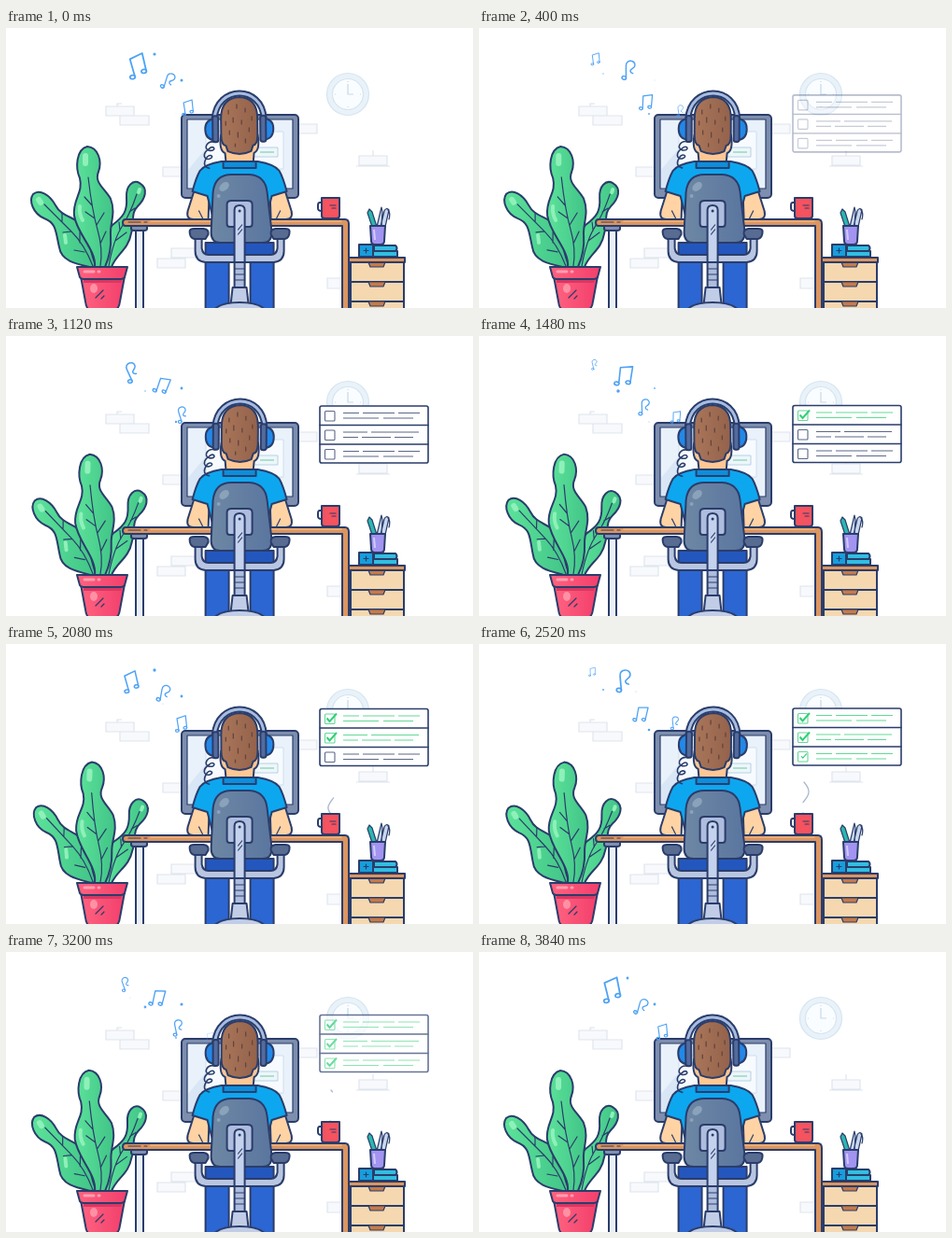
These frames come from a looping animation (500 px wide and 300 px high, 3.88 s). An HTML page:

```html
<!DOCTYPE html>
<html lang="en">
<head>
<meta charset="utf-8">
<title>Working with music</title>
<style>
html, body { margin: 0; height: 100%; overflow: hidden; background: #fff; }
svg { display: block; width: 500px; height: 300px; }
.ink { stroke: #2a3d6b; stroke-width: 2; stroke-linejoin: round; stroke-linecap: round; }
.thin { stroke-width: 1.2; }
.line { fill: none; stroke-linecap: round; stroke-linejoin: round; }
.faint { stroke: #dfe5ee; fill: #f7f9fc; stroke-width: 1.2; }
.note { fill: none; stroke: #4ea2f5; stroke-width: 1.8; stroke-linecap: round; stroke-linejoin: round; }
.note ellipse, #dots { fill: #4ea2f5; }
</style>
</head>
<body>
<svg viewBox="0 0 500 300">
  <defs>
    <linearGradient id="leaf"><stop stop-color="#5ce29a"/><stop offset="1" stop-color="#41c487"/></linearGradient>
    <linearGradient id="pink"><stop stop-color="#ff6380"/><stop offset="1" stop-color="#f23f6c"/></linearGradient>
    <linearGradient id="back"><stop stop-color="#6d87a4"/><stop offset="1" stop-color="#5b769f"/></linearGradient>
    <linearGradient id="hair"><stop stop-color="#a9765a"/><stop offset="1" stop-color="#94624b"/></linearGradient>
    <g id="double"><path d="M-5 11L-7 -8L7 -12L8 7"/><ellipse cx="-7.500" cy="11.500" rx="2.800" ry="2"/><ellipse cx="5.500" cy="7.500" rx="2.800" ry="2"/></g>
    <g id="single"><path d="M0 10L-4 -5C-7 -14 7 -16 7 -8C7 -4 2 -3 3 0Q4 2 7 2"/><ellipse cx="-2.500" cy="10.500" rx="2.800" ry="2.200"/></g>
    <g id="arm">
      <path class="ink" fill="#ffd3a4" d="M201 174L194 196Q192 205 200 205H216L217 177Z"/>
      <path class="ink line thin" d="M210 204L206 196"/>
      <path class="ink" fill="#0da7f0" d="M250 143H230Q212 146 207 153Q203 160 199 175L215 180L222 207H250"/>
    </g>
    <g id="rest">
      <path class="ink" fill="#b9c6e1" d="M202 225H209V236Q210 243 216 243H250V251H213Q202 250 202 239Z"/>
      <path class="ink" fill="#586b91" d="M196 218Q196 215 201 215H211Q217 216 216 221L213 226H201Q196 225 196 218Z"/>
    </g>
    <path id="leg" class="ink" fill="#2c66d2" d="M213 250H238V302H213Z"/>
    <g id="cup">
      <path class="ink" fill="#2388e8" d="M223 97Q213 98 213 108Q213 119 223 120Z"/>
      <rect class="ink" x="221" y="94" width="6" height="28" rx="2.500" fill="#536b9d"/>
    </g>
    <g id="drawer">
      <path class="ink" fill="#f5d8b0" d="M369 251H426V272H369Z"/>
      <path class="ink thin" fill="#c57b4b" d="M388 251H406L404 256H390Z"/>
    </g>
  </defs>

  <g class="faint">
    <path d="M107 84h30v10h-30zM122 94h31v10h-31zM119 84v-3h5M303 103h30v10h-30zM378 137h30v10h-30zM375 148h36M393 137v-6M168 149h25v10h-25zM177 236h32v10h-32zM162 247h30v10h-30zM344 268h18v11h-18z"/>
    <g stroke="#d5e5f1">
      <circle cx="366" cy="71" r="22.500" fill="#e9f2f9"/><circle cx="366" cy="71" r="16.500" fill="#fafdff"/>
      <path fill="none" stroke="#c7d9e9" d="M366 60V71H372M366 57v1M380 71h-1M366 85v-1M352 71h1"/>
    </g>
  </g>

  <g id="list">
    <rect class="ink" style="stroke-width:1.6" width="116" height="61" rx="2" fill="#fff"/>
    <path class="ink line" style="stroke-width:1.4" d="M0 20.500H116M0 41H116"/>
  </g>

  <rect class="ink" x="188" y="93" width="125" height="89" rx="4" fill="#7d8eae"/>
  <path class="ink thin" fill="#e9f1fa" d="M194 98H307V172H194Z"/>
  <path fill="#d8e6f5" d="M195 152L239 99H270L209 171H195Z"/>
  <path fill="#f7fbff" stroke="#cfdeed" d="M214 111H297V151H214Z"/>
  <path fill="#edf6fa" stroke="#b7d1e1" d="M262 128H291V138H262Z"/>
  <path stroke="#96d8bf" stroke-width="1.500" d="M272 133H287"/>

  <g id="dots"></g>
  <g id="notes"></g>

  <g id="plant">
    <g class="ink" fill="url(#leaf)">
      <path d="M106 256C104 240 102 222 114 211C126 202 130 196 129 182C128 169 136 162 143 166C153 172 149 183 141 191C133 199 138 207 134 220C131 238 118 242 113 256Z"/>
      <path d="M90 256C76 253 59 250 57 235C53 218 54 209 41 204C29 199 24 185 29 178C36 172 47 179 53 190C59 202 73 202 81 211C91 222 88 238 97 256Z"/>
      <path d="M95 256C97 238 76 221 73 201C71 183 83 177 79 161C74 150 75 130 87 127C99 128 103 143 99 154C94 166 106 172 112 183C118 198 111 210 112 222C113 235 111 245 106 256Z"/>
    </g>
    <g class="line" stroke="#8ff0b9" stroke-linecap="round">
      <path stroke-width="6" d="M85 137v8M35 184l2 3"/>
      <path stroke-width="4" d="M79 191Q78 199 82 206M63 222l1 8M143 173l-1 3"/>
    </g>
    <path class="ink thin line" d="M88 160Q92 195 98 216T101 255M92 190L84 181M95 204L85 197M97 211L105 198M101 231L107 218M41 189Q56 204 70 218T93 255M60 207L60 198M70 218L61 219M79 230L79 219M84 240L73 238M140 178Q133 199 124 213T110 255M132 197L138 193M122 217L121 208M117 228L129 219"/>
  </g>
  <path class="ink" fill="url(#pink)" d="M80 266H127L122 293Q121 302 115 302H91Q86 302 85 293Z"/>
  <path class="ink" fill="url(#pink)" d="M76 256H130L127 267Q126 269 123 269H83Q80 269 79 267Z"/>
  <path fill="#d93763" d="M83 270H124L123 273H83Z"/>
  <path class="line" stroke="#ff9fb1" stroke-width="3" d="M84 261H94M99 261h1"/>
  <ellipse cx="94" cy="279" rx="4" ry="5" fill="#ff91a5"/>
  <path class="ink thin line" d="M96 289L104 281M102 290L105 287"/>

  <path class="ink" fill="#eaf0fa" d="M139 212H147V302H139Z"/>
  <path class="ink" fill="#8090b0" d="M134 212H151V215Q151 217 148 217H137Q134 217 134 215Z"/>
  <path class="ink" fill="#dc955f" d="M128 205H363Q367 205 367 210V302H360V212H128Q125 212 125 208.500T128 205Z"/>
  <path class="line" stroke="#efb480" stroke-width="1.500" d="M155 207H359"/>
  <path class="ink thin line" d="M131 208H144M148 208H151"/>

  <path id="steam" class="line" stroke="#a9b9d1" stroke-width="1.300" pathLength="1" d="M347 181C343 176 345 172 349 167C355 160 354 155 348 148"/>
  <path class="ink line" d="M338 187H336Q334 187 334 190V193Q334 196 338 196"/>
  <path class="ink" fill="#f5535f" d="M338 182H357V201Q357 204 354 204H341Q338 204 338 201Z"/>
  <path class="ink thin line" d="M347 190H353M349 193H353"/>

  <use href="#drawer"/><use href="#drawer" y="21"/><use href="#drawer" y="42"/>
  <path class="ink" fill="#dc955f" d="M367 246H427V251H367Z"/>
  <path class="ink" fill="#179edc" d="M378 232H393V245H378Z"/>
  <path class="ink" fill="#31bfe2" d="M394 233H417Q420 236 417 239H394ZM393 239H419V245H393Z"/>
  <path class="ink line thin" d="M383 238.500h5M385.500 236v5"/>
  <path class="ink thin" fill="#2bb7b0" d="M392 213L387 198L389 194L392 197L397 213Z"/>
  <path class="ink thin" fill="#c9d7ee" d="M401 213L405 196Q407 192 410 195L406 213ZM397 213L401 196L402 192L403 197L402 213Z"/>
  <path class="ink line thin" d="M409 195Q412 198 410 205"/>
  <path class="ink" fill="#a294f0" d="M390 212H406L405 228Q405 232 401 232H395Q391 232 391 228Z"/>
  <path stroke="#d2c9ff" stroke-width="2" d="M394 216L395 227"/>

  <g transform="translate(.6 0)">
    <use href="#leg"/><use href="#leg" transform="matrix(-1 0 0 1 499 0)"/>
    <path class="ink" fill="#2457bd" d="M213 230H286V245H213Z"/>
    <use href="#arm"/><use href="#arm" transform="matrix(-1 0 0 1 499 0)"/>
    <path fill="#0da7f0" d="M235 144H264V190H235Z"/>

    <g id="head">
      <path class="ink" fill="#ffc794" d="M230 114Q227 131 234 134L235 145H264L265 134Q272 131 269 114Z"/>
      <path class="ink" fill="url(#hair)" d="M230 115V97Q230 75 250 74Q269 75 269 97V115Q269 125 264 126L262 132Q250 138 237 132L235 126Q230 125 230 115Z"/>
      <path class="line" stroke="#63453e" stroke-width="1.300" d="M238 88v4M247 82v4M256 86v4M263 95v4M235 100v4M243 96v5M252 99v4M260 107v4M239 110v4M248 112v5M256 119v4M245 124v3"/>
      <path class="ink line" style="stroke-width:7" d="M223 97C226 61 274 61 276 97"/>
      <path class="line" stroke="#a7bce1" stroke-width="3" d="M223 97C226 61 274 61 276 97"/>
      <use href="#cup"/><use href="#cup" transform="matrix(-1 0 0 1 499 0)"/>
      <path class="ink line" style="stroke-width:1.6" d="M223 122C215 120 210 129 217 131C226 132 222 124 217 129C209 134 211 141 217 140C224 138 217 133 214 139C210 145 212 149 217 150"/>
    </g>
    <path class="ink" fill="#0b8fdc" d="M232 143H267V150H232Z"/>

    <path class="ink" fill="url(#back)" d="M219 219L221 176Q223 157 241 157H260Q277 158 279 176L284 219Q284 230 274 230H229Q219 230 219 219Z"/>
    <g fill="#8ba2bb"><ellipse cx="233" cy="170" rx="6" ry="4" transform="rotate(-40 233 170)"/><circle cx="227" cy="180" r="2"/></g>
    <use href="#rest"/><use href="#rest" transform="matrix(-1 0 0 1 499 0)"/>
    <path fill="#b9c6e1" d="M240 244H260V250H240Z"/>
    <path class="ink" fill="#aebddd" d="M236 189Q236 185 241 185H258Q263 185 263 189V210Q263 213 260 213H239Q236 213 236 210Z"/>
    <path class="ink" fill="#c5d2ed" d="M244 195Q244 190 249.500 190T255 195V251H244Z"/>
    <circle cx="249.500" cy="196" r="1.500" fill="#2a3d6b"/>
    <path class="ink thin line" d="M248 216L252 211M248 221L252 216"/>
    <path class="ink" fill="#aebddd" d="M244 251H255V278H244Z"/>
    <path class="ink thin line" d="M244 258H255M244 264H255M244 270H255"/>
    <path class="ink" fill="#c1cde6" d="M242 278H257L259 296H240Z"/>
    <path class="ink" fill="#c1cde6" d="M222 302Q229 294 249.500 294T277 302Z"/>
  </g>
</svg>
<script>
const LOOP = 3880, BEAT = LOOP / 2;
const $ = id => document.getElementById(id);
const clamp = v => Math.max(0, Math.min(1, v));
const ramp = (t, a, b) => clamp((t - a) / (b - a));

function add(parent, tag, attrs) {
  const el = document.createElementNS('http://www.w3.org/2000/svg', tag);
  for (const key in attrs) el.setAttribute(key, attrs[key]);
  return parent.appendChild(el);
}

// Interpolates rows of [time, ...values].
function sample(rows, t) {
  let i = 1;
  while (i < rows.length - 1 && rows[i][0] < t) i++;
  const [a, b] = [rows[i - 1], rows[i]], k = ramp(t, a[0], b[0]);
  return a.slice(1).map((v, n) => v + (b[n + 1] - v) * k);
}

// age, x, y, scale, tilt
const noteTrack = [
  [0, 219, 92, .45, 5], [310, 209, 85, .55, 8], [700, 195, 85, .65, -3],
  [840, 188, 85, .67, -3], [1280, 174, 75, .7, 16], [1670, 173, 57, .73, 32],
  [1960, 163, 49, .75, 18], [2250, 154, 40, .95, 10], [2640, 141, 40, 1, -10],
  [2780, 134, 40, .85, -10], [2930, 127, 35, .58, -5], [3200, 122, 30, .4, 3],
  [3360, 118, 27, .25, 5], [3500, 116, 24, .12, 5]
];
const listTrack = [[300, 71], [720, 74.5], [1100, 75], [1480, 74.5], [2080, 69.5], [2520, 69], [3200, 67.5], [3500, 66]];

const notes = [0, 1, 2, 3].map(i =>
  add($('notes'), 'use', { href: i % 2 ? '#single' : '#double', class: 'note' }));

// x, y, radius, time of peak, half width
const dots = [
  [159, 28, 1.8, 80, 340], [188, 56, 1.6, 50, 420], [168, 64, .8, 0, 240], [133, 49, 1, 740, 700],
  [168, 51, 1, 740, 250], [182, 92, 1.5, 800, 900], [149, 59, 1.8, 1450, 480], [188, 56, 1.6, 1220, 500]
].map(([cx, cy, r, peak, width]) => ({ el: add($('dots'), 'circle', { cx, cy }), r, peak, width }));

const rows = [0, 1, 2].map(i => {
  const g = add($('list'), 'g', { transform: `translate(0 ${i * 20.5})`, fill: 'none', 'stroke-width': 1.1 });
  const box = add(g, 'rect', { x: 5.5, y: 5.5, width: 10.5, height: 10.5, rx: 1 });
  const text = add(g, 'path', { d: i % 2 ? 'M25 7.500H51M55 7.500H106M25 13H41M45 13H76M80 13H100' : 'M25 7.500H42M46 7.500H80M84 7.500H107M25 13H63M68 13H100' });
  const tick = add(g, 'path', { d: 'M7.500 10L10.500 13.500L18 5', stroke: '#32d078', 'stroke-width': 2 });
  return { box, text, tick, start: 1240 + i * 600 };
});

function draw(now) {
  const t = now % LOOP, phase = t % BEAT, turn = t / LOOP * 2 * Math.PI;

  notes.forEach((el, i) => {
    const age = (t + 700 + i * LOOP / 4) % LOOP;
    const [x, y, scale, tilt] = sample(noteTrack, age);
    el.setAttribute('transform', `translate(${x} ${y}) rotate(${tilt}) scale(${scale})`);
    el.setAttribute('opacity', ramp(age, -40, 180) * (1 - ramp(age, 3200, 3490)));
  });

  dots.forEach(({ el, r, peak, width }) => {
    const gap = Math.abs(phase - peak), power = clamp(1 - Math.min(gap, BEAT - gap) / width);
    el.setAttribute('r', r * Math.sqrt(power));
    el.setAttribute('opacity', clamp(power * 1.5));
  });

  const sway = 1.1 * (1 - Math.cos(turn - .15));
  $('plant').setAttribute('transform', `rotate(${sway} 101 256)`);
  $('head').setAttribute('transform', `rotate(${.7 * Math.sin(turn * 2 - 1)} 249 140)`);

  $('list').setAttribute('transform', `translate(336 ${sample(listTrack, t)[0]})`);
  $('list').setAttribute('opacity', ramp(t, 300, 600) * (1 - ramp(t, 3080, 3500)));
  rows.forEach(({ box, text, tick, start }) => {
    const done = ramp(t, start, start + 200), size = .25 + .75 * done;
    const color = t < start ? '#5b6888' : '#63d997';
    box.setAttribute('stroke', color);
    text.setAttribute('stroke', color);
    tick.setAttribute('opacity', t < start ? 0 : 1);
    tick.setAttribute('transform', `translate(11 10.500) scale(${size}) translate(-11 -10.500)`);
  });

  const head = ramp(t, 1700, 2480), tail = ramp(t, 2150, 3270);
  $('steam').setAttribute('stroke-dasharray', `0 ${tail} ${Math.max(0, head - tail)} 2`);
  $('steam').setAttribute('opacity', head > tail ? 1 : 0);

  requestAnimationFrame(() => draw(performance.now()));
}
draw(performance.now());
</script>
</body>
</html>
```
